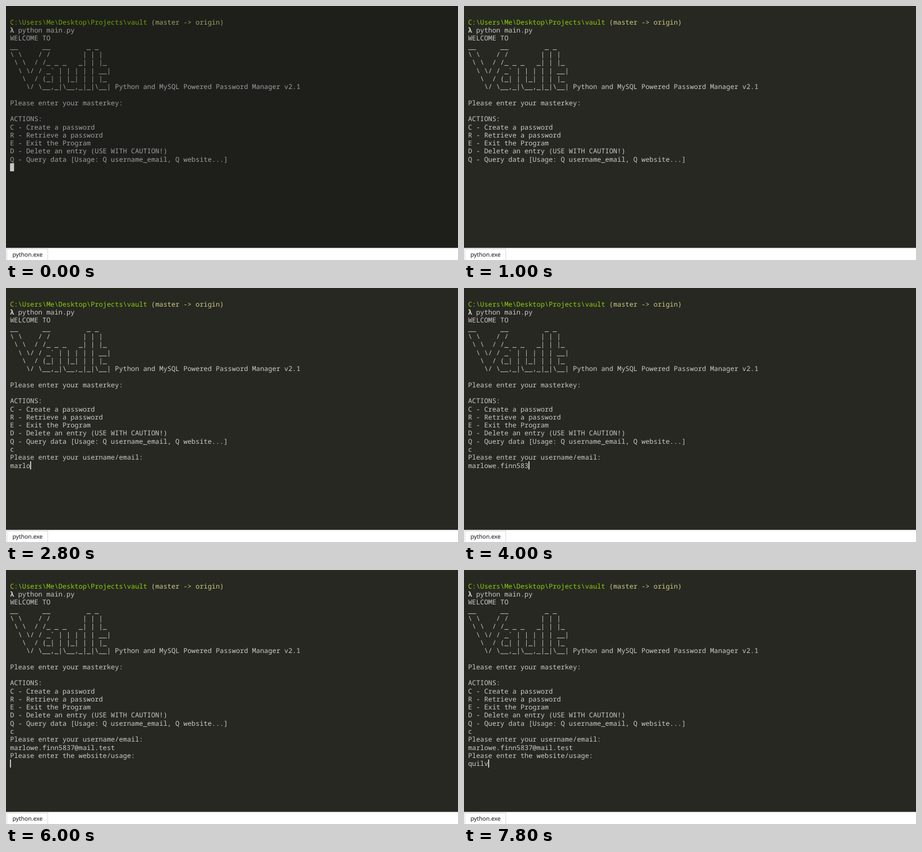
Recreate the animation shown at these times as an HTML page. Size 800 px wide and 450 px high, loop 8000 ms.

```html
<!DOCTYPE html>
<html lang="en">
<head>
<meta charset="utf-8">
<title>Vault password manager</title>
<style>
  html, body { margin: 0; width: 100%; height: 100%; overflow: hidden; background: #fff; }

  /* Laid out on a 10 x 20 character grid, shown at 800 x 450 */
  #stage {
    position: absolute; left: 0; top: 0; width: 1120px; height: 630px;
    transform: scale(calc(800 / 1120)); transform-origin: 0 0;
    text-rendering: geometricPrecision;
  }
  #terminal { position: absolute; inset: 0 0 30px; background: #272822; }
  #terminal.inactive { filter: brightness(.78); }
  pre {
    position: absolute; left: 10px; top: 30px; margin: 0;
    font: 16.667px/20px "Noto Sans Mono", monospace;
    font-variant-ligatures: none; color: #cacaca;
  }
  .path { color: #8dd006; }
  .branch { color: #cccc81; }
  .prompt { font-weight: bold; color: #dededa; }
  #cursor { position: absolute; width: 2px; height: 20px; background: #fff; }
  .inactive #cursor { width: 10px; }

  #tab {
    position: absolute; left: 2px; top: 602px; width: 100px; height: 28px;
    border: 1px solid #c6c6c6; border-bottom: 0; background: #fff;
    font: 14.4px/30px "Noto Sans", sans-serif; color: #111;
    text-indent: 13px; white-space: nowrap;
  }
</style>
</head>
<body>
<div id="stage">
  <div id="terminal">
<pre><span class="path">C:\Users\Me\Desktop\Projects\vault</span> <span class="branch">(master -&gt; origin)</span>
<span class="prompt">λ</span> python main.py
WELCOME TO
__      __         _ _
\ \    / /        | | |
 \ \  / /_ _ _   _| | |_
  \ \/ / _` | | | | | __|
   \  / (_| | |_| | | |_
    \/ \__,_|\__,_|_|\__| Python and MySQL Powered Password Manager v2.1

Please enter your masterkey:

ACTIONS:
C - Create a password
R - Retrieve a password
E - Exit the Program
D - Delete an entry (USE WITH CAUTION!)
Q - Query data [Usage: Q username_email, Q website...]
<span id="session"></span></pre>
    <div id="cursor"></div>
  </div>
  <div id="tab">python.exe</div>
</div>
<script>
  const LOOP = 8000, TICK = 200, FIRST_ROW = 18;
  const FOCUS = 200, BLINK = 600;
  const terminal = document.getElementById('terminal');
  const session = document.getElementById('session');
  const cursor = document.getElementById('cursor');

  // Each entry: when typing starts, characters present after each tick,
  // when Enter is pressed, and the question that follows.
  const entries = [
    { text: 'c', start: 1400, counts: [1], enter: 1600,
      reply: 'Please enter your username/email:' },
    { text: 'marlowe.finn5837@mail.test', start: 2000,
      counts: [1, 2, 3, 4, 5, 7, 9, 10, 12, 14, 15, 16, 18, 20, 21, 23, 25, 26],
      enter: 6000, reply: 'Please enter the website/usage:' },
    { text: 'quilv', start: 7200, counts: [1, 2, 4, 5], enter: Infinity }
  ];

  function typed({ text, start, counts }, t) {
    if (t < start) return '';
    const tick = Math.floor((t - start) / TICK);
    return text.slice(0, counts[Math.min(tick, counts.length - 1)]);
  }

  function sessionLines(t) {
    const lines = [];
    for (const entry of entries) {
      lines.push(typed(entry, t));
      if (t < entry.enter) break;
      lines.push(entry.reply);
    }
    return lines;
  }

  function cursorVisible(t) {
    const hidden = [FOCUS + BLINK, 6000 + BLINK];
    return !hidden.some(from => t >= from && t < from + BLINK);
  }

  function render(t) {
    const lines = sessionLines(t);
    const row = FIRST_ROW + lines.length - 1;
    const text = lines.join('\n');
    if (session.textContent !== text) session.textContent = text;
    terminal.className = t < FOCUS ? 'inactive' : '';
    cursor.style.left = 10 + 10 * lines.at(-1).length + 'px';
    cursor.style.top = 30 + 20 * row + 'px';
    cursor.style.visibility = cursorVisible(t) ? 'visible' : 'hidden';
  }

  const began = performance.now();
  function frame() {
    render((performance.now() - began) % LOOP);
    requestAnimationFrame(frame);
  }
  frame();
</script>
</body>
</html>
```
